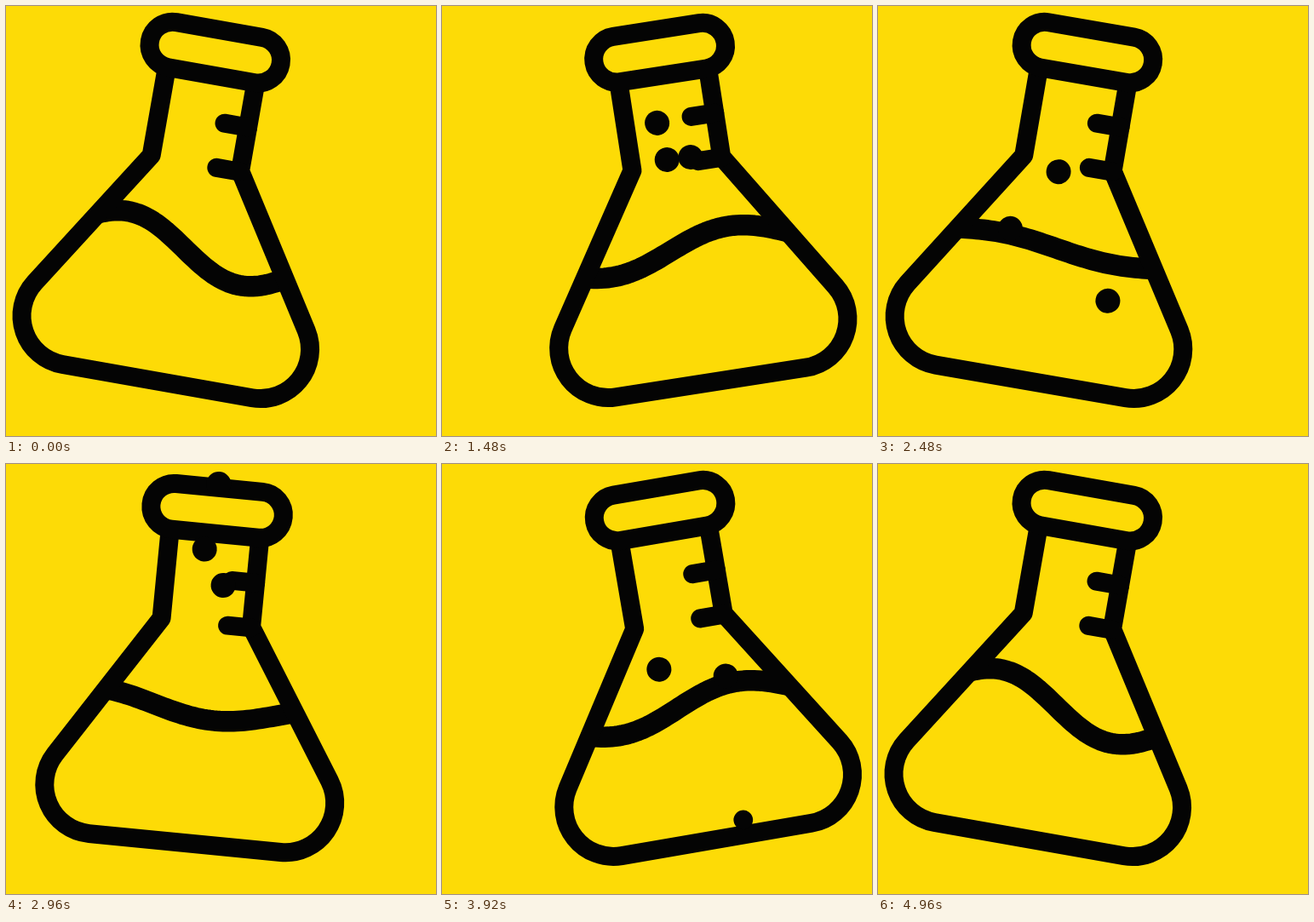
Write an HTML page that moves like this. It is 505 by 505 pixels and loops after 5000 ms.

```html
<!DOCTYPE html>
<html lang="en">
<head>
<meta charset="utf-8">
<title>Swinging flask</title>
<style>
  html, body { margin: 0; width: 100%; height: 100%; overflow: hidden; background: #fddb06; }
  svg { display: block; width: 100vw; height: 100vh; }
  .line { fill: none; stroke: #040404; stroke-width: 22; stroke-linejoin: round; }
  .tick { stroke-linecap: round; }
  #wave { stroke-width: 24.5; }
  circle { fill: #040404; }
</style>
</head>
<body>
<svg viewBox="0 0 505 505">
  <defs>
    <path id="body" d="M198 82V187L89 358A58 58 0 0 0 138 447H364A58 58 0 0 0 413 358L304 187V82"/>
    <clipPath id="inside"><use href="#body"/></clipPath>
  </defs>
  <g id="flask">
    <g clip-path="url(#inside)"><path id="wave" class="line"/></g>
    <use href="#body" class="line"/>
    <rect class="line" x="173" y="28" width="156" height="54" rx="27"/>
    <path class="line tick" d="M276 135H304M276 188H304"/>
    <g id="bubbles"></g>
  </g>
</svg>
<script>
const LOOP = 5000, STEP = 40, TURN = 2 * Math.PI;
const LAST = LOOP - STEP;
const PIVOT = { x: 251, y: 25 };
const SWING = { angle: 10, half: 1280 };
const WAVE = { level: 288, length: 290, start: 95 / 360 * TURN };
const RISE = { floor: 447, exit: -18, neck: 250, radius: 14.5, grow: 65 };

// Three bursts of three: birth in ms, x at the floor, speed in px per ms
const BUBBLES = [
  [458, 140, .304], [658, 205, .324], [480, 332, .265],
  [2000, 132, .36], [1800, 217, .365], [2215, 366, .41],
  [3351, 160, .366], [3380, 358, .347], [3880, 288, .433]
].map(([birth, from, speed]) => {
  const dot = document.createElementNS("http://www.w3.org/2000/svg", "circle");
  document.getElementById("bubbles").append(dot);
  return { birth, from, speed, dot };
});

const flask = document.getElementById("flask");
const wave = document.getElementById("wave");

// Four half swings; the last is shortened so that the loop closes
function swing(t) {
  const n = Math.min(3, Math.floor(t / SWING.half));
  const begin = n * SWING.half;
  const length = n < 3 ? SWING.half : LAST - begin;
  return SWING.angle * Math.cos(Math.PI * (n + (t - begin) / length));
}

// The crest runs round twice per loop while its height sinks and recovers
function wavePath(t) {
  const turn = TURN * t / LAST;
  const height = 19.5 + 12 * Math.cos(turn) ** 3;
  const trough = WAVE.start - 2 * turn;
  const points = [];
  for (let x = 70; x <= 432; x += 4) {
    const angle = (x - PIVOT.x) / WAVE.length * TURN - trough;
    points.push(`${x} ${(WAVE.level + height * Math.cos(angle)).toFixed(2)}`);
  }
  return "M" + points.join("L");
}

// Bubbles grow at the floor, rise evenly and ease towards the neck
function moveBubble({ birth, from, speed, dot }, t) {
  const age = t - birth;
  const u = age * speed / (RISE.floor - RISE.exit);
  const alive = u > 0 && u < 1;
  dot.setAttribute("r", alive ? RISE.radius * Math.min(1, Math.sqrt(age / RISE.grow)) : 0);
  if (!alive) return;
  dot.setAttribute("cx", from + (RISE.neck - from) * Math.sin(u * TURN / 4));
  dot.setAttribute("cy", RISE.floor - age * speed);
}

function draw(t) {
  flask.setAttribute("transform", `rotate(${swing(t)} ${PIVOT.x} ${PIVOT.y})`);
  wave.setAttribute("d", wavePath(t));
  BUBBLES.forEach(bubble => moveBubble(bubble, t));
}

const start = performance.now();
function tick() {
  const t = (performance.now() - start) % LOOP;
  draw(Math.floor(t / STEP) * STEP);
  requestAnimationFrame(tick);
}
tick();
</script>
</body>
</html>
```
